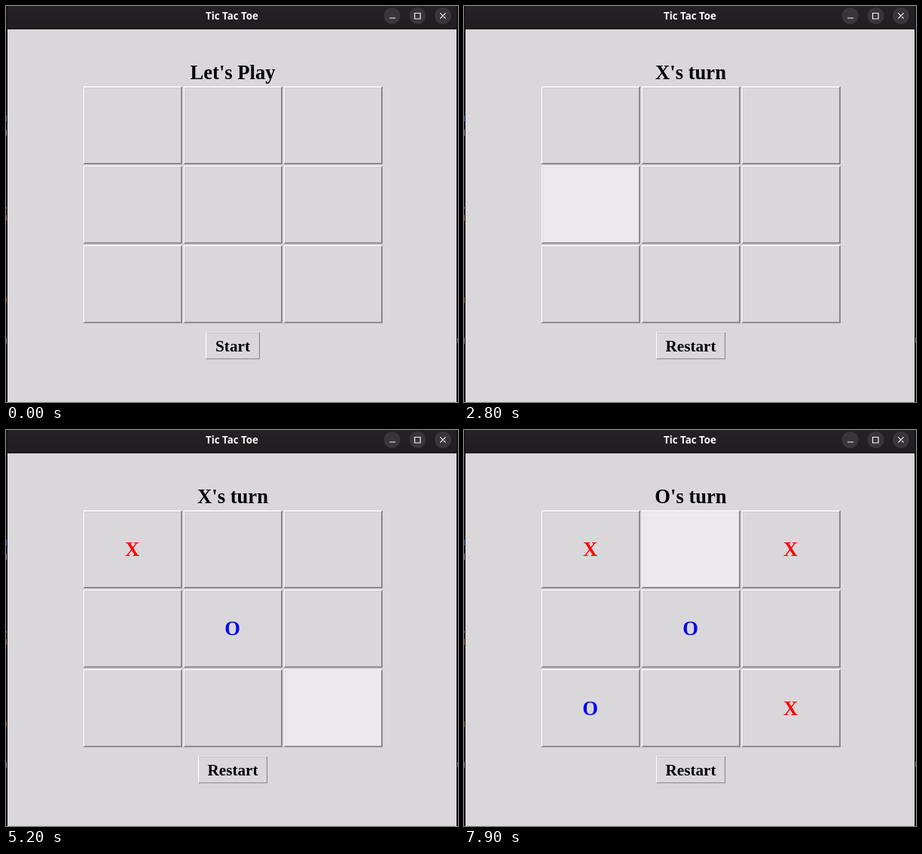
An HTML page with a canvas that plays this animation: 600 px wide and 525 px high, repeating every 8000 ms.

```html
<!DOCTYPE html>
<html lang="en">
<head>
<meta charset="utf-8">
<title>Tic Tac Toe</title>
<style>
  html, body { margin: 0; width: 100%; height: 100%; overflow: hidden; background: #d9d7d9; }
  canvas { display: block; }
</style>
</head>
<body>
<canvas id="stage" width="600" height="525"></canvas>
<script>
const ctx = document.getElementById('stage').getContext('2d');
const LOOP = 8000;
const FACE = '#d9d7d9', ACTIVE = '#ebe9eb', LIGHT = '#ffffff', DARK = '#838183', INK = '#030206';
const SERIF = '"Liberation Serif", "Times New Roman", serif';
const MARK = { X: '#fb0b08', O: '#0808f2' };
const BUTTON = 9;

// Each step changes part of the state; cells are numbered 0 to 8.
const steps = [
  { t: 0, title: "Let's Play", label: 'Start', hover: -1, press: -1 },
  { t: 1500, hover: BUTTON },
  { t: 2000, press: BUTTON },
  { t: 2100, press: -1, title: "X's turn", label: 'Restart' },
  { t: 2500, hover: 7 },
  { t: 2600, hover: 4 },
  { t: 2700, hover: 3 },
  { t: 3200, hover: 0 },
  { t: 3500, press: 0 },
  { t: 3700, press: -1, title: "O's turn", put: [0, 'X'] },
  { t: 4000, hover: 1 },
  { t: 4100, hover: 4 },
  { t: 4900, title: "X's turn", put: [4, 'O'] },
  { t: 5200, hover: 8 },
  { t: 5700, title: "O's turn", put: [8, 'X'] },
  { t: 5900, hover: 7 },
  { t: 6100, hover: 6 },
  { t: 6700, press: 6 },
  { t: 6800, press: -1, title: "X's turn", put: [6, 'O'] },
  { t: 6900, hover: 4 },
  { t: 7000, hover: 2 },
  { t: 7700, press: 2 },
  { t: 7800, press: -1, title: "O's turn", put: [2, 'X'] },
  { t: 7900, hover: 1 }
];

function stateAt(time) {
  const state = { marks: {} };
  for (const step of steps) {
    if (step.t > time) break;
    Object.assign(state, step);
    if (step.put) state.marks[step.put[0]] = step.put[1];
  }
  return state;
}

function rect(x, y, w, h, color) {
  ctx.fillStyle = color;
  ctx.fillRect(x, y, w, h);
}

function text(str, x, y, font, color) {
  ctx.font = font;
  ctx.fillStyle = color;
  ctx.textAlign = 'center';
  ctx.fillText(str, x, y);
}

function serif(str, x, y, size, color) {
  text(str, x, y, `bold ${size}px ${SERIF}`, color);
}

function bevel(x, y, w, h, b, face, sunken) {
  const [near, far] = sunken ? [DARK, LIGHT] : [LIGHT, DARK];
  rect(x, y, w, h, far);
  ctx.fillStyle = near;
  ctx.beginPath();
  ctx.moveTo(x, y + h);
  ctx.lineTo(x, y);
  ctx.lineTo(x + w, y);
  ctx.lineTo(x + w - b, y + b);
  ctx.lineTo(x + b, y + b);
  ctx.lineTo(x + b, y + h - b);
  ctx.fill();
  rect(x + b, y + b, w - 2 * b, h - 2 * b, face);
}

function drawWindow() {
  rect(0, 0, 600, 525, '#151317');
  rect(2, 31, 596, 494, FACE);
  const bar = ctx.createLinearGradient(0, 0, 0, 31);
  bar.addColorStop(0, '#252227');
  bar.addColorStop(1, '#201d22');
  rect(2, 0, 596, 30.5, bar);
  text('Tic Tac Toe', 300, 17.5, 'bold 13.3px "Noto Sans", "Open Sans", sans-serif', '#f8f6f8');

  for (const x of [512.5, 546.5, 580]) {
    ctx.fillStyle = '#39363b';
    ctx.beginPath();
    ctx.arc(x, 13, 11, 0, Math.PI * 2);
    ctx.fill();
  }
  ctx.strokeStyle = '#f4f2f4';
  ctx.lineWidth = 1.2;
  ctx.beginPath();
  ctx.moveTo(509, 16);
  ctx.lineTo(517, 16);
  ctx.rect(542.5, 9.5, 7.5, 7.5);
  ctx.moveTo(576.3, 9.3);
  ctx.lineTo(583.7, 16.7);
  ctx.moveTo(583.7, 9.3);
  ctx.lineTo(576.3, 16.7);
  ctx.stroke();

  // Slivers of the editor behind the window
  rect(0, 145, 1, 8, '#3f5fae');
  rect(0, 164, 1, 8, '#8a888c');
  rect(0, 266, 1, 3, '#77543e');
  rect(0, 277, 1, 8, '#8e5a40');
  rect(0, 386, 1, 8, '#6d5531');
  rect(0, 440, 1, 8, '#77757a');
  rect(599, 440, 1, 7, '#77757a');
}

function draw(time) {
  const s = stateAt(time);
  const face = id => s.hover === id ? ACTIVE : FACE;
  drawWindow();
  serif(s.title, 301, 97, 26.6, INK);

  for (let i = 0; i < 9; i++) {
    const col = i % 3, row = Math.floor(i / 3);
    const x = 102.4 + col * 133, y = 106.3 + row * 105.3;
    bevel(x, y, 131.5, 103.6, 1.8, face(i), s.press === i);
    const mark = s.marks[i];
    if (mark) serif(mark, x + 65.2, y + 60.7, 26.6, s.hover === i ? INK : MARK[mark]);
  }

  const w = s.label === 'Start' ? 72 : 92;
  bevel(301 - w / 2, 432.3, w, 36, 1, face(BUTTON), s.press === BUTTON);
  serif(s.label, 301, 457.5, 21.2, INK);
}

function tick() {
  draw(performance.now() % LOOP);
  requestAnimationFrame(tick);
}
tick();
</script>
</body>
</html>
```
